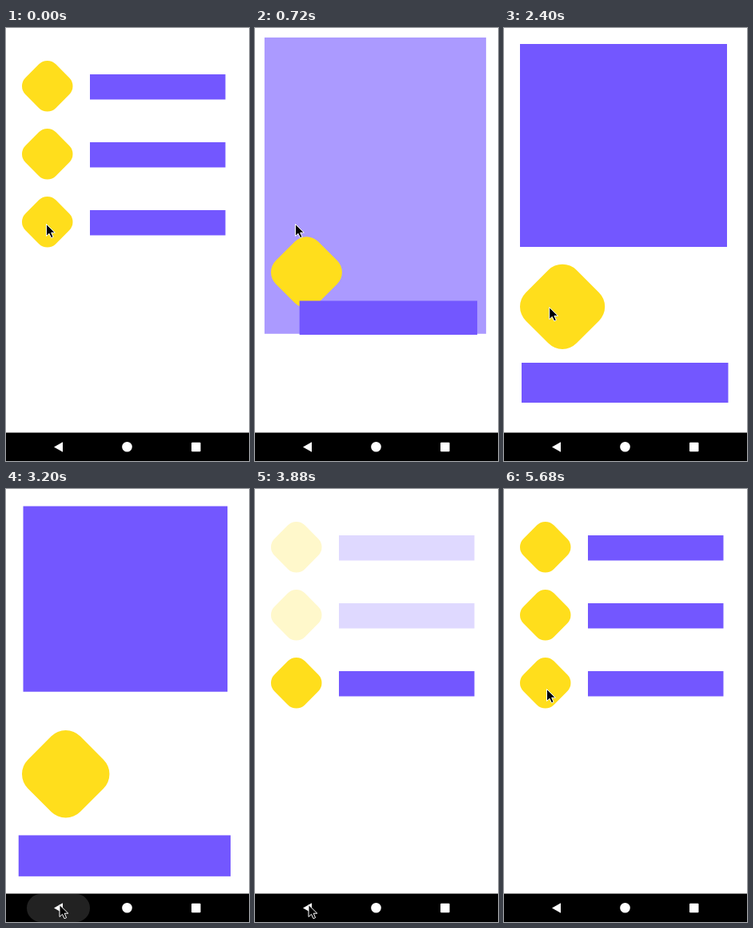
An HTML page that plays this animation: 304x542 px, repeating every 5.7 s.

```html
<!DOCTYPE html>
<html lang="en">
<head>
<meta charset="utf-8">
<title>Shared element transition</title>
<style>
  html, body { margin: 0; width: 100%; height: 100%; overflow: hidden; background: #fff; }
  svg { display: block; width: 100%; height: 100%; }
  .bar, #panel { fill: #7357ff; }
  .gem { fill: #ffde1c; }
</style>
</head>
<body>
<svg viewBox="0 0 304 542">
  <rect id="panel"/>
  <g id="others"></g>
  <g id="hero"></g>
  <g id="nav">
    <rect y="506.5" width="304" height="36"/>
    <rect id="ripple" x="26" y="507" width="79" height="35" rx="17.5" fill="#222"/>
    <path d="M60 524.5 71 518.2V530.8Z" fill="#fff"/>
    <circle cx="151.5" cy="524.3" r="6.3" fill="#fff"/>
    <rect x="232" y="518.7" width="11.5" height="11.5" rx="1" fill="#fff"/>
  </g>
  <path id="cursor" d="M0 0V15L3.5 11.8 6 17.2 8.6 16.1 6.2 10.7H10.8Z" stroke="#fff" stroke-width="1"/>
</svg>
<script>
const LOOP = 5700;
const MIRROR = 4327;   // the way back replays the way in, reversed about this sum
const MOVE = { start: 606, length: 727 };
const FADE = { start: 100, length: 450 };

// Boxes are left, top, right, bottom
const LIST = { gem: [20, 41, 83.5, 104.5], bar: [105, 58, 274.5, 89.5] };
const DETAIL = { gem: [20, 295.7, 126.2, 401.9], bar: [22, 419, 280.5, 469] };
const PANEL = { from: [0, 0, 304, 542], to: [20, 20, 279, 274] };
const ROW = 85;

// time, x, y of the pointer tip
const POINTER = [
  [0, 50.5, 245.5], [2150, 50.5, 245.5], [2750, 67, 520.5],
  [4680, 67, 520.5], [5220, 50, 100], [5660, 53.5, 250.5], [LOOP, 53.5, 250.5]
];
// time, opacity of the back button highlight
const RIPPLE = [[0, 0], [2920, 0], [3020, 1], [3220, 1], [3480, 0], [LOOP, 0]];

const $ = id => document.getElementById(id);
const clamp = v => Math.min(1, Math.max(0, v));
const mix = (a, b, p) => a + (b - a) * p;
const mixBox = (a, b, p) => a.map((v, i) => mix(v, b[i], p));
const down = (box, dy) => [box[0], box[1] + dy, box[2], box[3] + dy];
const smooth = u => u * u * (3 - 2 * u);
const outBack = u => {
  const t = 1 - u, s = 1.70158;
  return 1 - t * t * ((s + 1) * t - s);
};

function setAttrs(el, attrs) {
  for (const name in attrs) el.setAttribute(name, attrs[name]);
}

function addRect(parent, cls) {
  const el = document.createElementNS("http://www.w3.org/2000/svg", "rect");
  el.setAttribute("class", cls);
  return parent.appendChild(el);
}

function placeBar(el, [l, t, r, b]) {
  setAttrs(el, { x: l, y: t, width: r - l, height: b - t });
}

// A rounded square standing on its corner inside the box
function placeGem(el, [l, t, r, b]) {
  const size = r - l, side = size * 0.845;
  setAttrs(el, {
    x: -side / 2, y: -side / 2, width: side, height: side, rx: size * 0.235,
    transform: `translate(${(l + r) / 2} ${(t + b) / 2}) rotate(45)`
  });
}

function sample(steps, t, ease) {
  const i = steps.findIndex(step => step[0] > t);
  const a = steps[i - 1], b = steps[i];
  const u = ease((t - a[0]) / (b[0] - a[0]));
  return a.slice(1).map((v, k) => mix(v, b[k + 1], u));
}

for (let row = 0; row < 2; row++) {
  placeGem(addRect($("others"), "gem"), down(LIST.gem, row * ROW));
  placeBar(addRect($("others"), "bar"), down(LIST.bar, row * ROW));
}
const heroGem = addRect($("hero"), "gem");
const heroBar = addRect($("hero"), "bar");

function draw(time) {
  const t = time % LOOP;
  const way = Math.min(t, Math.max(0, MIRROR - t));
  const part = span => clamp((way - span.start) / span.length);
  const p = outBack(part(MOVE));

  placeBar($("panel"), mixBox(PANEL.from, PANEL.to, p));
  $("panel").setAttribute("opacity", clamp(p));
  $("others").setAttribute("opacity", 1 - part(FADE));
  placeGem(heroGem, mixBox(down(LIST.gem, 2 * ROW), DETAIL.gem, p));
  placeBar(heroBar, mixBox(down(LIST.bar, 2 * ROW), DETAIL.bar, p));

  $("ripple").setAttribute("opacity", sample(RIPPLE, t, u => u)[0]);
  const [x, y] = sample(POINTER, t, smooth);
  $("cursor").setAttribute("transform", `translate(${x} ${y})`);
}

const began = performance.now();
function tick() {
  draw(performance.now() - began);
  requestAnimationFrame(tick);
}
tick();
</script>
</body>
</html>
```
